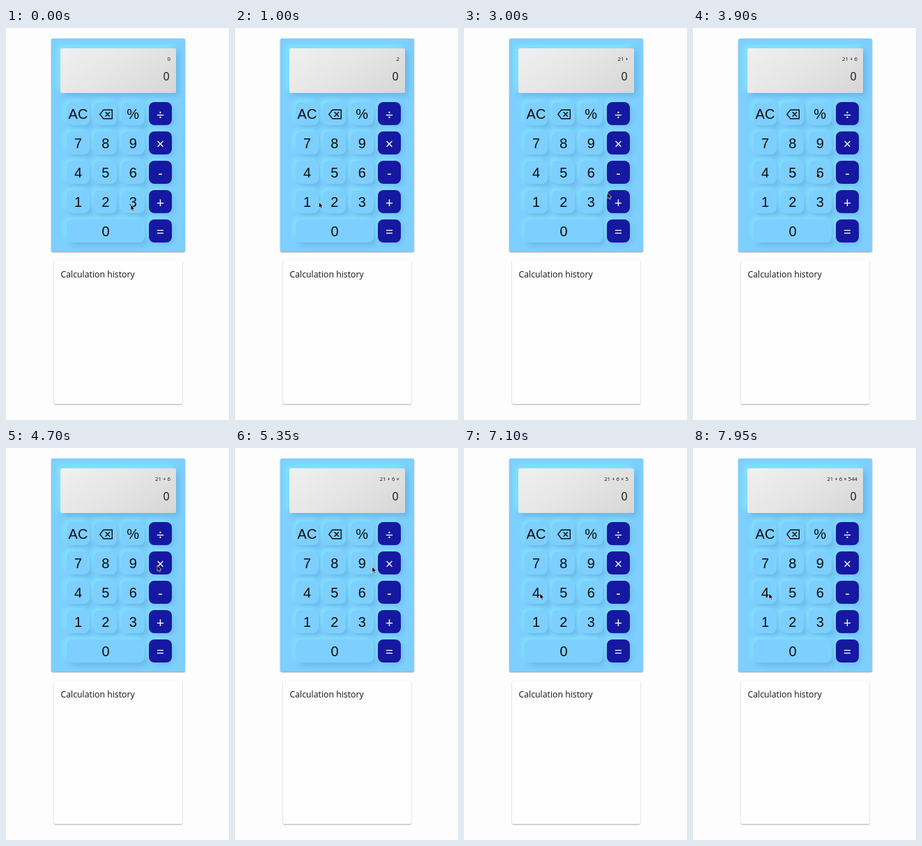
An HTML page that plays this animation: 320x561 px, repeating every 8000 ms.

```html
<!DOCTYPE html>
<html lang="en">
<head>
<meta charset="utf-8">
<title>Calculator</title>
<style>
html, body { margin: 0; width: 100%; height: 100%; overflow: hidden; background: #fdfdfd; }
body { position: relative; }
#stage { position: absolute; left: 0; top: 0; width: 320px; height: 561px; overflow: hidden; }
#stage div { position: absolute; box-sizing: border-box; }
.body { left: 65px; top: 15px; width: 192px; height: 305px; border-radius: 2px; background: #7dcfff; box-shadow: 0 1px 2px rgba(0,0,0,.4); overflow: hidden; }
.screen { left: 78px; top: 29px; width: 166px; height: 64px; border-radius: 2px; background: linear-gradient(145deg, #f0f0f0, #e6e6e6 45%, #d6d6d6); box-shadow: 4px 4px 8px #67b5e2, -4px -4px 9px #82ecff; }
.key { height: 33px; border-radius: 8px; background: #7dcfff; box-shadow: 4px 4px 8px #69b6e3, -3px -3px 7px #86e6ff; }
.op { background: #1518a0; box-shadow: 3px 3px 7px #70bdec, -3px -3px 7px #86e0ff; }
.card { left: 69px; top: 333px; width: 184px; height: 205px; border-radius: 2px; background: #fefefe; box-shadow: 0 1px 2px rgba(0,0,0,.32); }
svg { position: absolute; left: 0; top: 0; }
text { font-family: "Open Sans", "Noto Sans", sans-serif; }
.cap { font: 20px "Liberation Sans", sans-serif; text-anchor: middle; fill: #080c10; }
.sign { font: 20px "Open Sans", sans-serif; text-anchor: middle; fill: #fff; }
</style>
</head>
<body>
<div id="stage">
  <div class="body"></div>
  <div class="screen"></div>
  <div class="card"></div>
  <svg id="art" width="320" height="561" viewBox="0 0 320 561">
    <g id="caps"></g>
    <path d="M139.8 117.2H152.3V129.8H139.8L134.8 123.5ZM142.6 120.2L149 126.8M149 120.2L142.6 126.8" fill="none" stroke="#080c10" stroke-width="1.4"/>
    <text id="expr" x="236" y="47" font-size="7.8" text-anchor="end" fill="#111"></text>
    <text x="230" y="75" font-size="16" text-anchor="middle" fill="#111">0</text>
    <text x="78.5" y="357" font-size="12.3" font-weight="500" fill="#111">Calculation history</text>
    <path id="cursor" d="M0 0V8.2L1.9 6.5L3.1 9.3L4.6 8.7L3.4 6H5.9Z" fill="#050505" stroke="#fff" stroke-width=".6" stroke-linejoin="round"/>
  </svg>
</div>
<script>
const LOOP = 8000;
const stage = document.getElementById('stage');
const art = document.getElementById('art');
const caps = document.getElementById('caps');
const expr = document.getElementById('expr');
const cursor = document.getElementById('cursor');

const rows = [['AC', '', '%', '÷'], ['7', '8', '9', '×'], ['4', '5', '6', '-'], ['1', '2', '3', '+']];

function addKey(label, x, y, w, isOp) {
  const key = document.createElement('div');
  key.className = isOp ? 'key op' : 'key';
  key.style.cssText = `left:${x}px;top:${y}px;width:${w}px`;
  stage.insertBefore(key, art);
  const text = document.createElementNS('http://www.w3.org/2000/svg', 'text');
  text.setAttribute('class', isOp ? 'sign' : 'cap');
  text.setAttribute('x', x + w / 2);
  text.setAttribute('y', y + (isOp ? 25 : 23.8));
  text.textContent = label;
  caps.append(text);
}

rows.forEach((row, r) => row.forEach((label, c) =>
  addKey(label, 87 + c * 39.35, 106 + r * 42, 33, c === 3)));
addKey('0', 87, 274, 112, false);
addKey('=', 205, 274, 33, true);

// [time, display]
const entries = [[0, '0'], [600, '2'], [1300, '21'], [2600, '21 +'], [3600, '21 + 6'],
  [5150, '21 + 6 ×'], [6200, '21 + 6 × 5'], [7350, '21 + 6 × 54'], [7750, '21 + 6 × 544']];

// [time, x, y] of the pointer tip
const path = [[0, 179, 253], [450, 148, 250], [750, 148, 250], [1150, 108, 249], [1550, 108, 249],
  [1900, 148, 244.5], [2300, 221, 246], [2750, 221, 246], [3000, 206, 236], [3350, 177.5, 206.5],
  [4150, 177.5, 206.5], [4700, 217, 168], [5180, 217, 168], [5350, 197, 170], [5800, 148, 208],
  [6350, 148, 208], [6850, 109, 208], [LOOP, 109, 208]];

// Passing points keep their speed; resting points ease in and out.
function slope(i, k) {
  const a = path[i - 1], b = path[i + 1];
  if (!a || !b) return 0;
  const p = path[i];
  const before = (p[k] - a[k]) / (p[0] - a[0]);
  const after = (b[k] - p[k]) / (b[0] - p[0]);
  return before * after > 0 ? 2 * before * after / (before + after) : 0;
}

function pointer(t, k) {
  let i = 0;
  while (i < path.length - 2 && path[i + 1][0] <= t) i++;
  const a = path[i], b = path[i + 1], d = b[0] - a[0];
  const u = (t - a[0]) / d, v = 1 - u;
  return v * v * (1 + 2 * u) * a[k] + u * u * (3 - 2 * u) * b[k]
    + u * v * d * (v * slope(i, k) - u * slope(i + 1, k));
}

function draw(t) {
  expr.textContent = entries.filter(e => e[0] <= t).pop()[1];
  cursor.setAttribute('transform', `translate(${pointer(t, 1)} ${pointer(t, 2)})`);
}

const start = performance.now();
function tick() {
  draw((performance.now() - start) % LOOP);
  requestAnimationFrame(tick);
}
draw(0);
requestAnimationFrame(tick);
</script>
</body>
</html>
```
